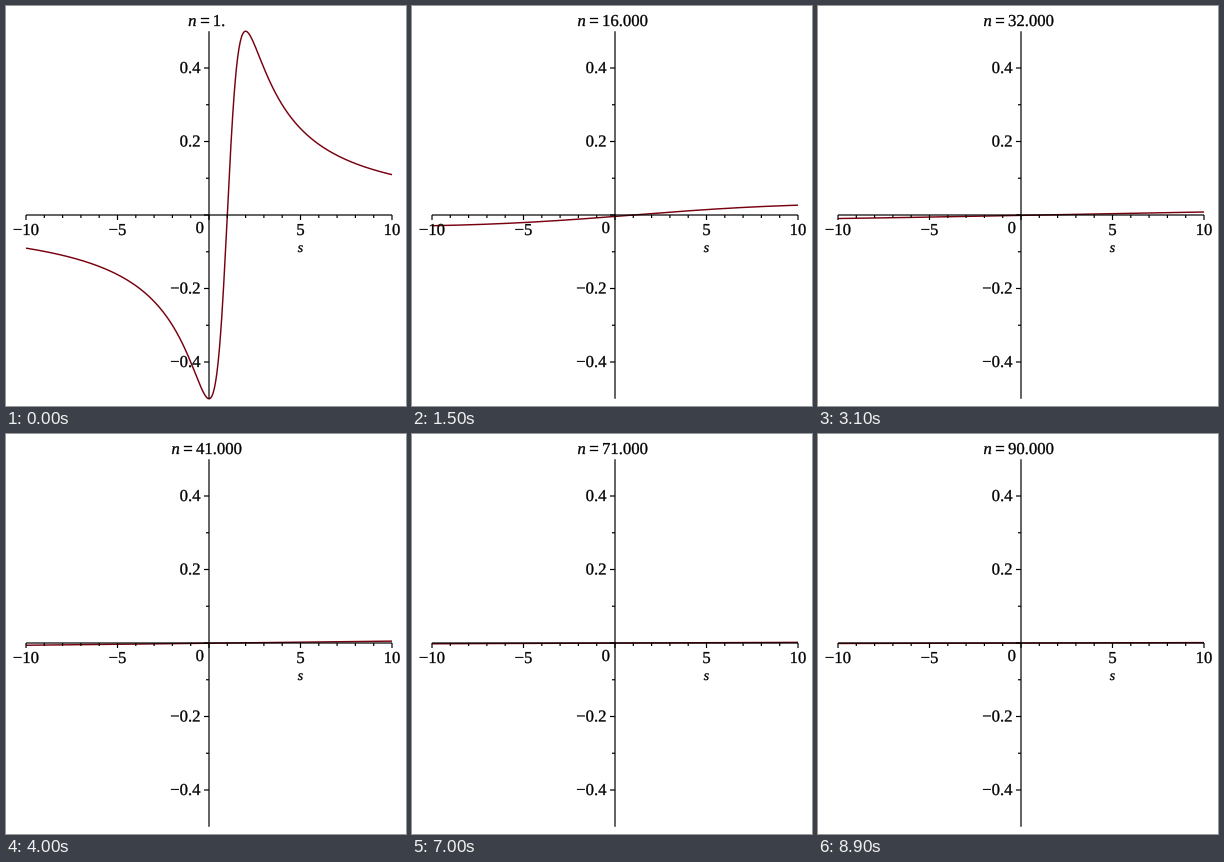
Write a matplotlib script that moves like this. It is 400 px wide and 400 px high and loops after 9000 ms.

```python
import numpy as np
import matplotlib.pyplot as plt
from matplotlib.animation import FuncAnimation
from matplotlib.patheffects import Stroke

plt.rcParams.update({
    "font.family": "Liberation Serif",
    "text.hinting": "no_hinting",
    "toolbar": "None",
})

SIZE, DPI, FRAMES = 400, 100, 90
PX = 72 / DPI                      # points per pixel
X0, Y0 = 203, 209                  # plot origin in pixels
SX, SY = 18.3, 367.5               # pixels per unit
EM = 16.7                          # text size in pixels
MAROON = "#78000e"

fig = plt.figure(figsize=(SIZE / DPI, SIZE / DPI), dpi=DPI, facecolor="white")
ax = fig.add_axes([0, 0, 1, 1])
ax.set_xlim(0, SIZE)
ax.set_ylim(SIZE, 0)
ax.axis("off")


def stroke(x1, y1, x2, y2):
    ax.plot([x1, x2], [y1, y2], color="black", lw=1.2 * PX, zorder=3,
            solid_capstyle="butt", snap=False)


def label(x, y, text="", ha="center", size=EM, style="normal"):
    weight = Stroke(linewidth=0.3 * PX, foreground="black")
    return ax.text(x, y, text, ha=ha, va="baseline", fontsize=size * PX,
                   style=style, color="black", zorder=4,
                   path_effects=[weight])


def signed(value):
    return f"{value:g}".replace("-", "\u2212")


def draw_axes():
    stroke(X0 - 10 * SX, Y0, X0 + 10 * SX, Y0)
    stroke(X0, Y0 - SY / 2, X0, Y0 + SY / 2)
    for s in range(-10, 11):
        major = s % 5 == 0
        x = X0 + s * SX
        stroke(x, Y0, x, Y0 + (5 if major else 3))
        if major and s:
            label(x, 229, signed(s))
    for k in range(-4, 5):
        major = k % 2 == 0
        y = Y0 - k * SY / 10
        stroke(X0 - (5 if major else 3), y, X0, y)
        if major and k:
            label(194.6, y + 5, signed(k / 10), ha="right")
    label(193.8, 227, "0")
    label(294.4, 246, "s", size=14, style="italic")


def title_number(n):
    if n == 1:
        return "1."
    return f"{n:.4f}" if n < 10 else f"{n:.3f}"


draw_axes()
s = np.linspace(-10, 10, 601)
curve, = ax.plot([], [], color=MAROON, lw=1.45 * PX, zorder=2,
                 solid_capstyle="butt", snap=False)
name = label(0, 20, "n", ha="left", style="italic")
equals = label(0, 20, "=", ha="left")
number = label(0, 20, ha="left")


def update(i):
    n = i + 1
    f = (s - 1) / (n**2 + (s - 1)**2)
    curve.set_data(X0 + s * SX, Y0 - f * SY)

    text = title_number(n)
    digits = EM * (0.5 * (len(text) - 1) + 0.25)
    left = 200.7 - (24.6 + digits) / 2
    name.set_x(left)
    equals.set_x(left + 12.2)
    number.set_x(left + 24.6)
    number.set_text(text)
    return curve, name, equals, number


anim = FuncAnimation(fig, update, frames=FRAMES, interval=100,
                     repeat=True, repeat_delay=0, blit=False)
plt.show()
```
